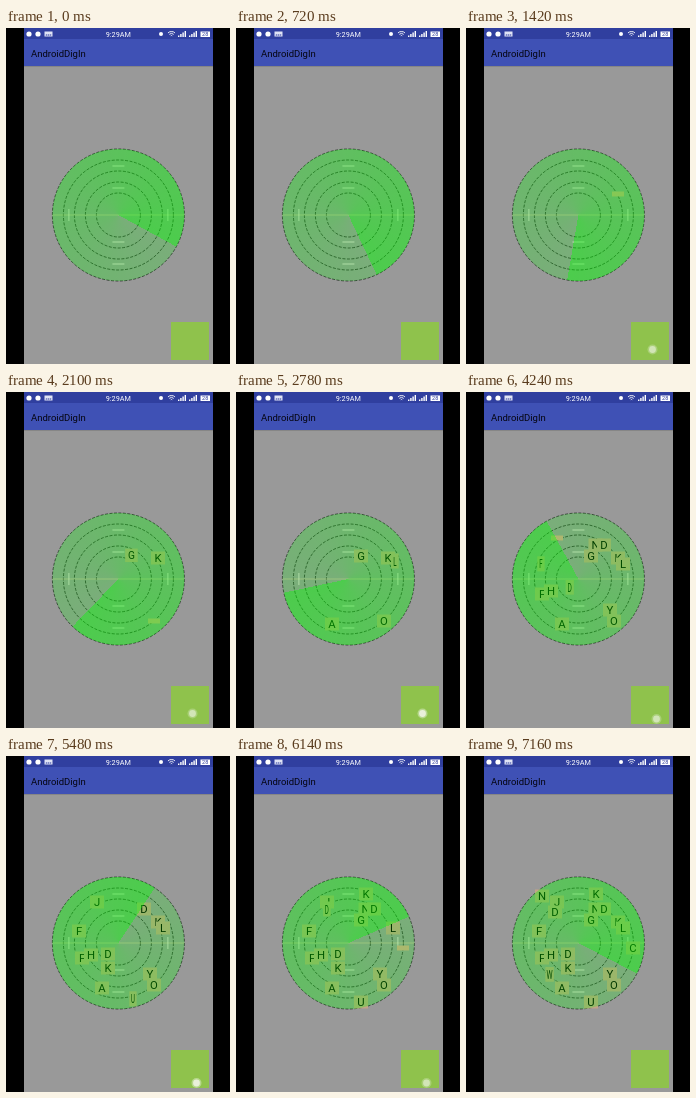
Recreate the animation shown at these times as an HTML page with a canvas. Size 224x336 px, loop 7180 ms.

```html
<!DOCTYPE html>
<html lang="en">
<head>
<meta charset="utf-8">
<title>Radar</title>
<style>
html, body { margin: 0; width: 100%; height: 100%; overflow: hidden; background: #000; }
canvas { display: block; }
</style>
</head>
<body>
<canvas id="stage" width="224" height="336"></canvas>
<script>
const ctx = document.getElementById('stage').getContext('2d');
const LOOP = 7180, CX = 112.4, CY = 187, R = 66, TAU = Math.PI * 2;
const START = 28.6; // sweep angle in degrees at time 0

// letter, centre x, centre y, time of appearance
const letters = [
  ['K', 152, 166, 1380], ['G', 125, 164, 1750], ['O', 148, 229, 2050],
  ['A', 96, 232, 2330], ['L', 157, 172, 2600], ['N', 129.5, 153, 2860],
  ['D', 138, 153, 3110], ['Y', 144, 218, 3330], ['F', 76, 202, 3560],
  ['H', 85, 199, 3800], ['D', 102, 198, 4040], ['F', 73, 175, 4070],
  ['J', 91, 146, 4200], ['K', 102, 212, 4750], ['U', 125, 246, 5310],
  ['K', 130, 138, 5560], ['D', 89, 156, 5960], ['C', 167, 192, 6090],
  ['N', 76, 140, 6500], ['W', 82, 221, 6950]
];

function rect(color, x, y, w, h) {
  ctx.fillStyle = color;
  ctx.fillRect(x, y, w, h);
}

function dot(color, x, y, r) {
  ctx.fillStyle = color;
  ctx.beginPath();
  ctx.arc(x, y, r, 0, TAU);
  ctx.fill();
}

function text(str, x, y, font, color, align = 'center') {
  ctx.font = font + ' Roboto, sans-serif';
  ctx.textAlign = align;
  ctx.fillStyle = color;
  ctx.fillText(str, x, y);
}

function signal(x) {
  for (let i = 0; i < 4; i++) rect('#fff', x + i * 2.2, 7.5 - i * 1.5, 1.4, 1.5 + i * 1.5);
}

function wifi(x, y) {
  ctx.strokeStyle = '#fff';
  ctx.lineWidth = .9;
  for (const r of [1, 3, 5]) {
    ctx.beginPath();
    ctx.arc(x, y, r, -TAU * 3 / 8, -TAU / 8);
    ctx.stroke();
  }
}

function drawChrome() {
  rect('#000', 0, 0, 224, 336);
  rect('#999', 18, 0, 189, 336);
  rect('#3f51b5', 18, 0, 189, 38);
  rect('#303f9f', 18, 0, 189, 11);
  rect('rgba(0,0,0,.12)', 18, 38, 189, 1);

  dot('#fff', 23, 6, 2.6);
  dot('#fff', 32, 6, 2.6);
  rect('#dfe3f5', 38.5, 3.5, 8, 5);
  text('zzz', 42.5, 7.7, '4px', '#303f9f');
  text('9:29AM', 112.3, 9, '7.3px', '#fff');
  dot('#fff', 155, 6, 2);
  wifi(165.5, 8.5);
  signal(172);
  signal(183);
  rect('#fff', 194.5, 3.5, 9.5, 5.5);
  text('28', 199.2, 8.2, '5.5px', '#303f9f');
  text('AndroidDigIn', 25, 28.5, '9.5px', '#050510', 'left');
}

function drawGrid() {
  ctx.strokeStyle = 'rgba(0,0,0,.85)';
  ctx.lineWidth = .7;
  ctx.setLineDash([3, 1.5]);
  for (let i = 2; i <= 6; i++) {
    ctx.beginPath();
    ctx.arc(CX, CY, i * R / 6, 0, TAU);
    ctx.stroke();
  }
  ctx.setLineDash([]);

  rect('rgba(225,200,165,.6)', CX - R, CY - .5, 2 * R, 1);
  const tick = 'rgba(255,240,240,.7)';
  for (const s of [-1, 1]) {
    rect(tick, CX + s * 49.5 - .5, CY - 6, 1, 12);
    rect(tick, CX - 6, CY + s * 49 - .5, 12, 1);
    rect(tick, CX - 6, CY + s * 27 - .5, 12, 1);
  }
}

// translucent green beam, laid over the grid and the letters
function drawSweep(deg) {
  const sweep = ctx.createConicGradient(deg * TAU / 360, CX, CY);
  sweep.addColorStop(0, 'rgba(0,255,0,.2)');
  sweep.addColorStop(1, 'rgba(0,255,0,.5)');
  dot(sweep, CX, CY, R);
}

function drawLetter([char, x, y, born], t, deg) {
  const age = t - born;
  if (age < 0) return;
  // letters blink out just after the beam passes over them
  const angle = Math.atan2(y - CY, x - CX) * 360 / TAU;
  const lag = ((deg - angle) % 360 + 360) % 360;
  if (age > 400 && lag > 2 && lag < 9) return;

  if (age < 110) {
    rect('#dca48c', x - 6, y - 2.5, 12, 5);
    return;
  }
  const left = 1 - Math.min(1, (age - 110) / 290);
  ctx.save();
  ctx.translate(x + 2.5 * left, y - 4 * left);
  ctx.scale(1 - .6 * left, 1 + .2 * left);
  rect('#c4a287', -7, -6.5, 14, 13);
  text(char, 0, 4, '11.3px', '#000');
  ctx.restore();
}

function drawButton(t) {
  rect('#8fc24c', 165, 294, 38, 38);
  const tap = letters.find(l => t > l[3] - 150 && t < l[3] + 70);
  if (!tap) return;
  const late = t > 3000;
  const x = late ? 190.5 : 186.5, y = late ? 327 : 321.5;
  ctx.globalAlpha = t > tap[3] ? .6 : .9;
  dot('rgba(255,255,255,.4)', x, y, 5);
  dot('#eef3e2', x, y, 3.4);
  ctx.globalAlpha = 1;
}

const origin = performance.now();
function frame() {
  const t = Math.max(0, performance.now() - origin) % LOOP;
  const deg = START + t / LOOP * 360;
  drawChrome();
  drawGrid();
  for (const l of letters) drawLetter(l, t, deg);
  drawSweep(deg);
  drawButton(t);
  requestAnimationFrame(frame);
}
frame();
</script>
</body>
</html>
```
